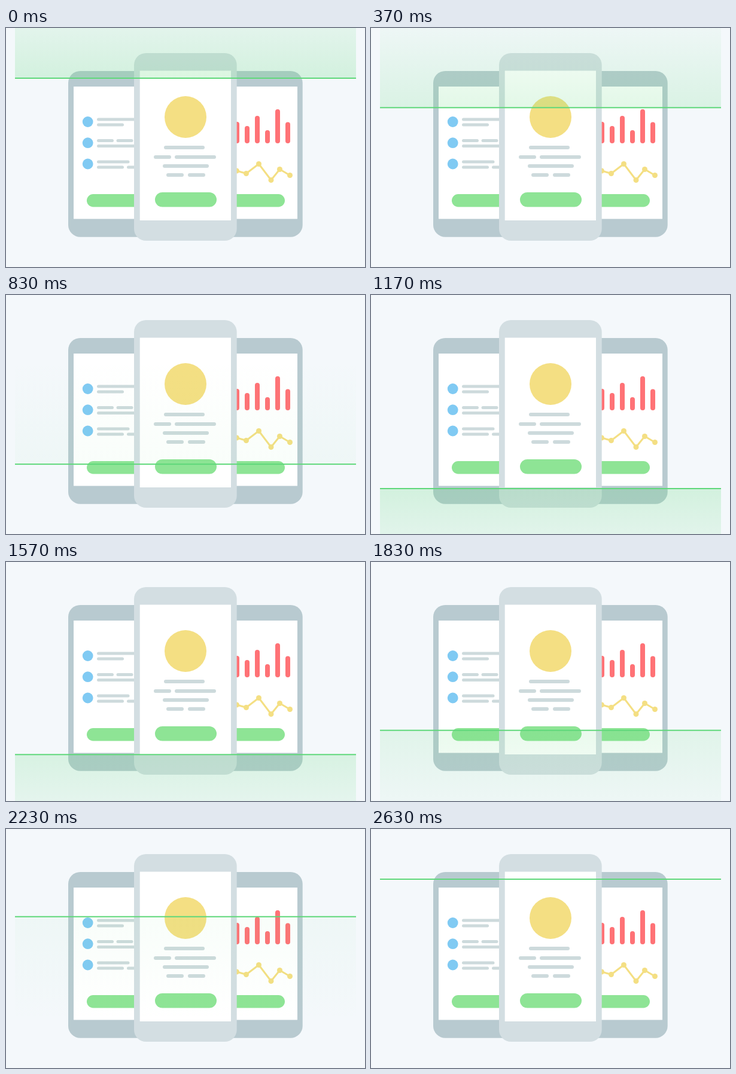
Recreate the animation shown at these times as an HTML page. Size 600x400 px, loop 2.67 s.

```html
<!DOCTYPE html>
<html lang="en">
<head>
<meta charset="utf-8">
<title>Device scan</title>
<style>
  html, body { margin: 0; height: 100%; overflow: hidden; background: #f4f8fb; }
  svg { display: block; }
  path { fill: none; stroke-linecap: round; stroke-linejoin: round; }
</style>
</head>
<body>
<svg width="600" height="400" viewBox="0 0 600 400">
  <defs>
    <linearGradient id="glow" x1="0" y1="0" x2="0" y2="1">
      <stop offset="0" stop-color="#5fd87a" stop-opacity=".225"/>
      <stop offset="1" stop-color="#5fd87a" stop-opacity="0"/>
    </linearGradient>
    <marker id="dot" viewBox="-5 -5 10 10" markerWidth="10" markerHeight="10" markerUnits="userSpaceOnUse">
      <circle r="4.5" fill="#f4df83"/>
    </marker>
  </defs>

  <!-- side devices -->
  <rect x="104" y="72" width="391.7" height="277.7" rx="20" fill="#b8cad0"/>
  <rect x="113" y="98" width="374" height="221.5" fill="#fff"/>
  <g fill="#80caf3">
    <circle cx="136.7" cy="157" r="8.9"/>
    <circle cx="136.7" cy="192.2" r="8.9"/>
    <circle cx="136.7" cy="227.5" r="8.9"/>
  </g>
  <path stroke="#cddadc" stroke-width="5" d="M154.5 153H220M154.5 162H194.500M154.500 188.500H177.500M187 188.500H210M154.500 197.500H220M154.500 224H204M154.500 233H194.500M204.500 233H220"/>
  <rect x="135" y="278" width="331" height="21.5" rx="10.75" fill="#8ee495"/>
  <path stroke="#ff7276" stroke-width="8" d="M386 161V189M403 168V189M420 151V189M437 175V189M454 140V189M471 161.500V189"/>
  <path stroke="#f4df83" stroke-width="3" marker-start="url(#dot)" marker-mid="url(#dot)" marker-end="url(#dot)" d="M385.500 239L401.500 243.500 422.500 227.500 443 254.500 457.500 236.500 474.500 246.500"/>

  <!-- front phone -->
  <rect x="214" y="42" width="171.7" height="314" rx="20" fill="#d3dee2"/>
  <rect x="223.7" y="71.5" width="152.3" height="250.500" fill="#fff"/>
  <circle cx="300" cy="149" r="35" fill="#f4df83"/>
  <path stroke="#cddadc" stroke-width="6" d="M267 200H329M250 216H273M285 216H348M265 231H336M271 246H294M307 246H330"/>
  <rect x="249" y="275" width="103" height="24.500" rx="12.25" fill="#8ee495"/>

  <!-- scanner -->
  <g id="scan">
    <rect id="trail" x="15" width="570" height="175" fill="url(#glow)"/>
    <rect x="15" y="-1" width="570" height="2" fill="#5fd87a"/>
  </g>
</svg>
<script>
  const LOOP = 2670, TURN = 1160, TOP = 84, BOTTOM = 324;
  const scan = document.getElementById('scan');
  const trail = document.getElementById('trail');

  // cubic-bezier(.42, 0, .58, 1) between two times
  function ease(t, from, to) {
    const x = Math.min(1, Math.max(0, (t - from) / (to - from)));
    let lo = 0, hi = 1, s = .5;
    for (let i = 0; i < 24; i++) {
      s = (lo + hi) / 2;
      const bx = 1.26 * s * (1 - s) ** 2 + 1.74 * s * s * (1 - s) + s ** 3;
      if (bx < x) lo = s; else hi = s;
    }
    return s * s * (3 - 2 * s);
  }

  function draw(t) {
    const down = t < TURN;
    const y = TOP + (BOTTOM - TOP) * (ease(t, 10, TURN) - ease(t, 1503, 2630));
    const fade = down ? ease(t, 0, TURN) : ease(t, TURN, LOOP);
    scan.setAttribute('transform', `translate(0 ${y.toFixed(2)})`);
    trail.setAttribute('transform', `scale(1 ${down ? -1 : 1})`);
    trail.setAttribute('opacity', (1 - fade).toFixed(3));
  }

  const start = performance.now();
  function tick() {
    draw((performance.now() - start) % LOOP);
    requestAnimationFrame(tick);
  }
  tick();
</script>
</body>
</html>
```
